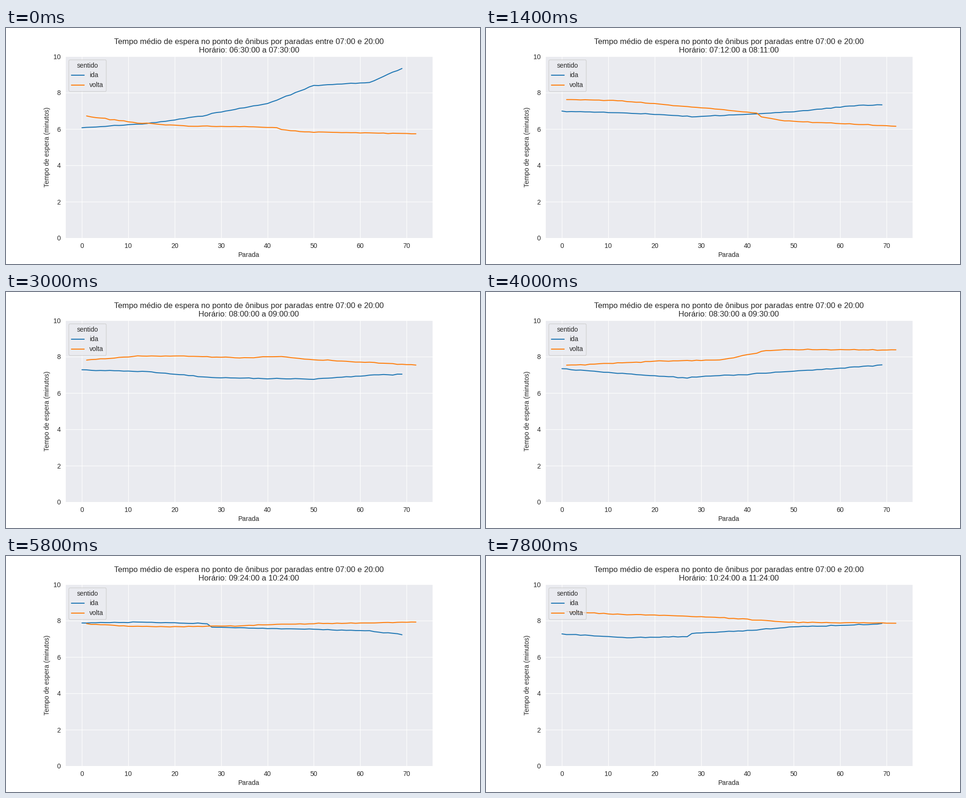
Write a matplotlib script that moves like this. It is 1000 by 500 pixels and loops after 8 s.

```python
import numpy as np
import matplotlib.pyplot as plt
from matplotlib.animation import FuncAnimation

INK = "0.15"
plt.rcParams.update({
    "font.family": "Liberation Sans", "font.size": 10,
    "axes.facecolor": "#EAEBF0", "axes.edgecolor": "white",
    "axes.grid": True, "axes.axisbelow": True, "grid.color": "white",
    "axes.labelcolor": INK, "text.color": INK,
    "xtick.color": INK, "ytick.color": INK,
    "xtick.bottom": False, "ytick.left": False,
    "lines.solid_capstyle": "round",
})

FRAMES, INTERVAL = 40, 200
ROUGHNESS = 0.012
KEY_STEPS = np.array([0, 4, 10, 20, 26, 33, 39])
rng = np.random.default_rng(7)


class Direction:
    """Waiting time along the stops, bending at a few of them, over the day."""

    def __init__(self, color, bends, *waits):
        self.color = color
        self.stops = np.arange(bends[0], bends[-1] + 1)
        rows = [np.interp(self.stops, bends, row) for row in waits]
        self.waits = rng.normal(rows, ROUGHNESS)
        self.slopes = np.gradient(self.waits, KEY_STEPS, axis=0)

    def at(self, step):
        """Cubic Hermite blend between the neighbouring key steps."""
        k = np.searchsorted(KEY_STEPS[1:-1], step, side="right")
        span = KEY_STEPS[k + 1] - KEY_STEPS[k]
        t = (step - KEY_STEPS[k]) / span
        (w0, w1), (m0, m1) = self.waits[k:k + 2], self.slopes[k:k + 2] * span
        rise = t * t * (3 - 2 * t)
        return (w0 + (w1 - w0) * rise
                + m0 * t * (1 - t) ** 2 - m1 * t * t * (1 - t))


directions = {
    "ida": Direction(
        "#1f77b4", [0, 14, 27, 28, 40, 50, 62, 69],
        [6.07, 6.30, 6.77, 6.86, 7.40, 8.39, 8.56, 9.34],
        [6.62, 6.44, 6.48, 6.57, 7.02, 7.55, 7.91, 8.18],
        [7.25, 7.33, 7.02, 6.87, 6.68, 6.53, 6.73, 6.73],
        [7.34, 7.06, 6.82, 6.88, 7.04, 7.20, 7.40, 7.55],
        [8.14, 8.02, 7.75, 7.37, 7.13, 6.98, 6.95, 6.85],
        [7.32, 7.49, 7.66, 7.86, 8.08, 8.27, 8.15, 7.93],
        [7.27, 7.07, 7.12, 7.30, 7.46, 7.67, 7.75, 7.84]),
    "volta": Direction(
        "#ff7f0e", [1, 12, 24, 34, 42, 43, 48, 72],
        [6.71, 6.34, 6.15, 6.14, 6.08, 5.97, 5.85, 5.74],
        [7.20, 6.95, 6.64, 6.46, 6.34, 6.13, 6.01, 5.90],
        [7.95, 8.09, 7.91, 7.69, 7.47, 7.31, 6.99, 6.49],
        [7.51, 7.66, 7.78, 7.82, 8.18, 8.30, 8.39, 8.37],
        [7.67, 7.57, 7.64, 7.71, 7.92, 7.94, 8.03, 8.13],
        [8.08, 7.92, 7.83, 7.80, 7.75, 7.74, 7.64, 7.71],
        [8.50, 8.35, 8.28, 8.16, 8.04, 8.02, 7.92, 7.86]),
}


def clock(hour):
    # truncated on purpose: 9.1 h reads 09:05
    return f"{int(hour):02d}:{int(hour % 1 * 60):02d}:00"


fig, ax = plt.subplots(figsize=(10, 5), dpi=100)
lines = {name: ax.plot(d.stops, d.at(0), color=d.color, label=name)[0]
         for name, d in directions.items()}
ax.set(xlim=(-3.6, 75.6), ylim=(0, 10),
       xlabel="Parada", ylabel="Tempo de espera (minutos)")
ax.legend(title="sentido", loc="upper left")


def draw(i):
    hour = (65 + i) / 10
    for name, line in lines.items():
        line.set_ydata(directions[name].at(i))
    ax.set_title("Tempo médio de espera no ponto de ônibus por paradas "
                 "entre 07:00 e 20:00\n"
                 f"Horário: {clock(hour)} a {clock(hour + 1)}")
    return list(lines.values())


anim = FuncAnimation(fig, draw, frames=FRAMES, interval=INTERVAL,
                     repeat=True, repeat_delay=0)
plt.show()
```
